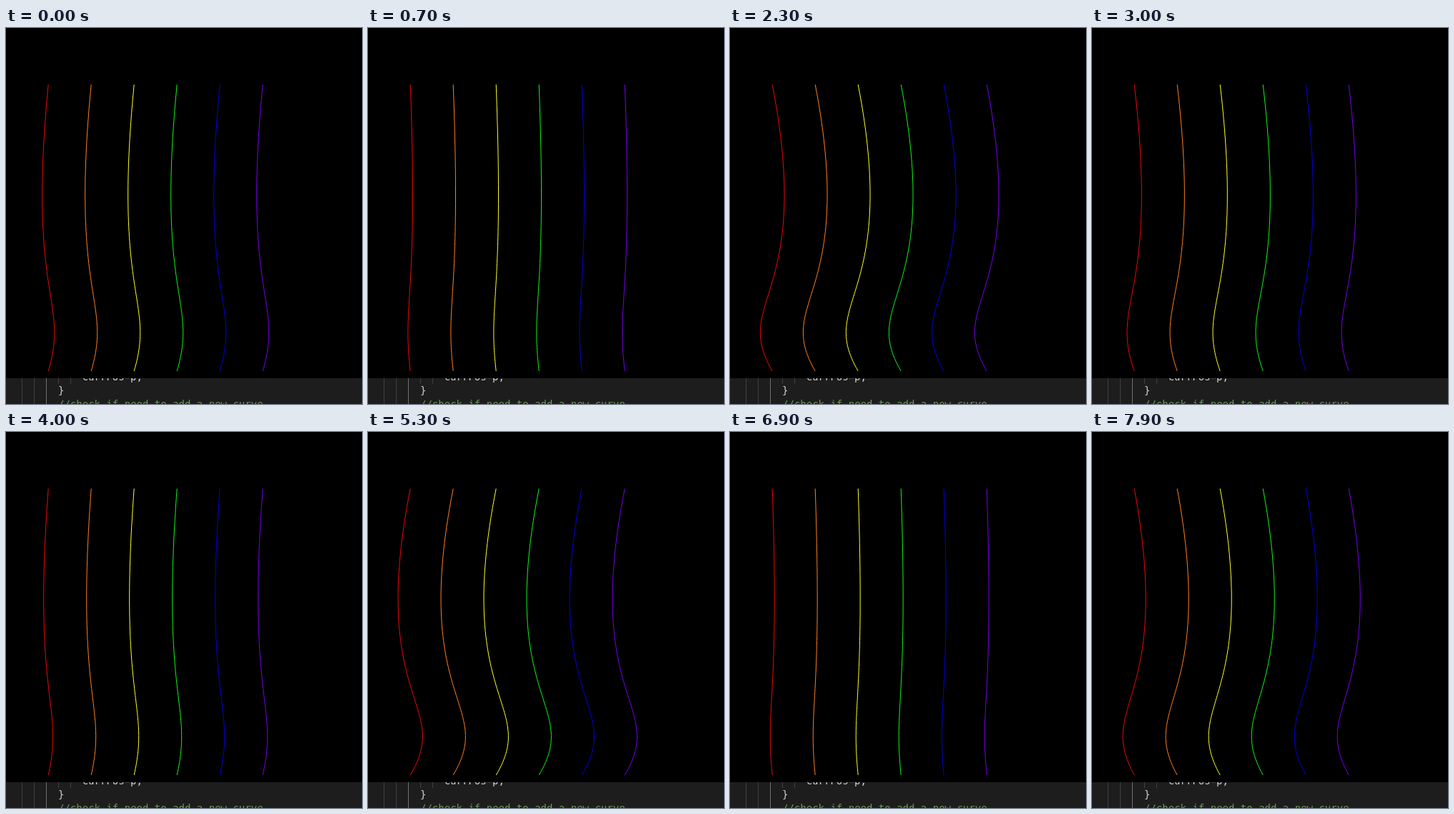
Recreate the animation shown at these times as an HTML page. Size 498 by 525 pixels, loop 8000 ms.

```html
<!DOCTYPE html>
<html lang="en">
<head>
<meta charset="utf-8">
<title>Swaying curves</title>
<style>
  html, body { margin: 0; width: 100%; height: 100%; overflow: hidden; background: #000; }
  svg { display: block; width: 498px; height: 525px; }
  .curves path { fill: none; stroke-width: 1; }
  .editor { font: 14px "DejaVu Sans Mono", monospace; fill: #d4d4d4; white-space: pre; }
  .guides { fill: #404040; shape-rendering: crispEdges; }
  .guides .active { fill: #707070; }
  .comment { fill: #6a9955; }
</style>
</head>
<body>
<svg viewBox="0 0 498 525">
  <defs>
    <clipPath id="pane"><rect y="489" width="498" height="36"/></clipPath>
  </defs>
  <rect width="498" height="525"/>
  <g class="editor" clip-path="url(#pane)">
    <rect y="489" width="498" height="36" fill="#1e1d1e"/>
    <g class="guides">
      <rect x="22" y="489" width="1" height="36"/>
      <rect x="39" y="489" width="1" height="36"/>
      <rect x="56" y="489" width="1" height="36" class="active"/>
      <rect x="73" y="489" width="1" height="8"/>
      <rect x="90" y="489" width="1" height="8"/>
    </g>
    <text x="106.7" y="492">currPos=p;</text>
    <text x="73" y="511">}</text>
    <text x="73" y="530" class="comment">//check if need to add a new curve</text>
  </g>
  <g class="curves"></g>
</svg>
<script>
  const LOOP = 8000, STEP = 100;
  const TOP = 79, BOTTOM = 479, BEND = 379;
  const REACH = 60, SPEED = 0.101, TURN = 51.75;
  const colors = ["#f00808", "#ff8020", "#ffff28", "#10f818", "#0000e8", "#7800f0"];

  const group = document.querySelector(".curves");
  const curves = colors.map((color, i) => {
    const path = document.createElementNS("http://www.w3.org/2000/svg", "path");
    path.setAttribute("stroke", color);
    group.append(path);
    return { path, x: 59.2 + 60 * i };
  });

  // Both control points share a height and swing in opposite directions.
  function draw(now) {
    const step = Math.floor((now % LOOP) / STEP);
    const sway = -REACH * Math.cos(SPEED * (step - TURN));
    for (const { path, x } of curves) {
      path.setAttribute("d",
        `M${x} ${TOP}C${x + sway} ${BEND} ${x - sway} ${BEND} ${x} ${BOTTOM}`);
    }
  }

  const start = performance.now();
  function tick() {
    draw(performance.now() - start);
    requestAnimationFrame(tick);
  }
  tick();
</script>
</body>
</html>
```
